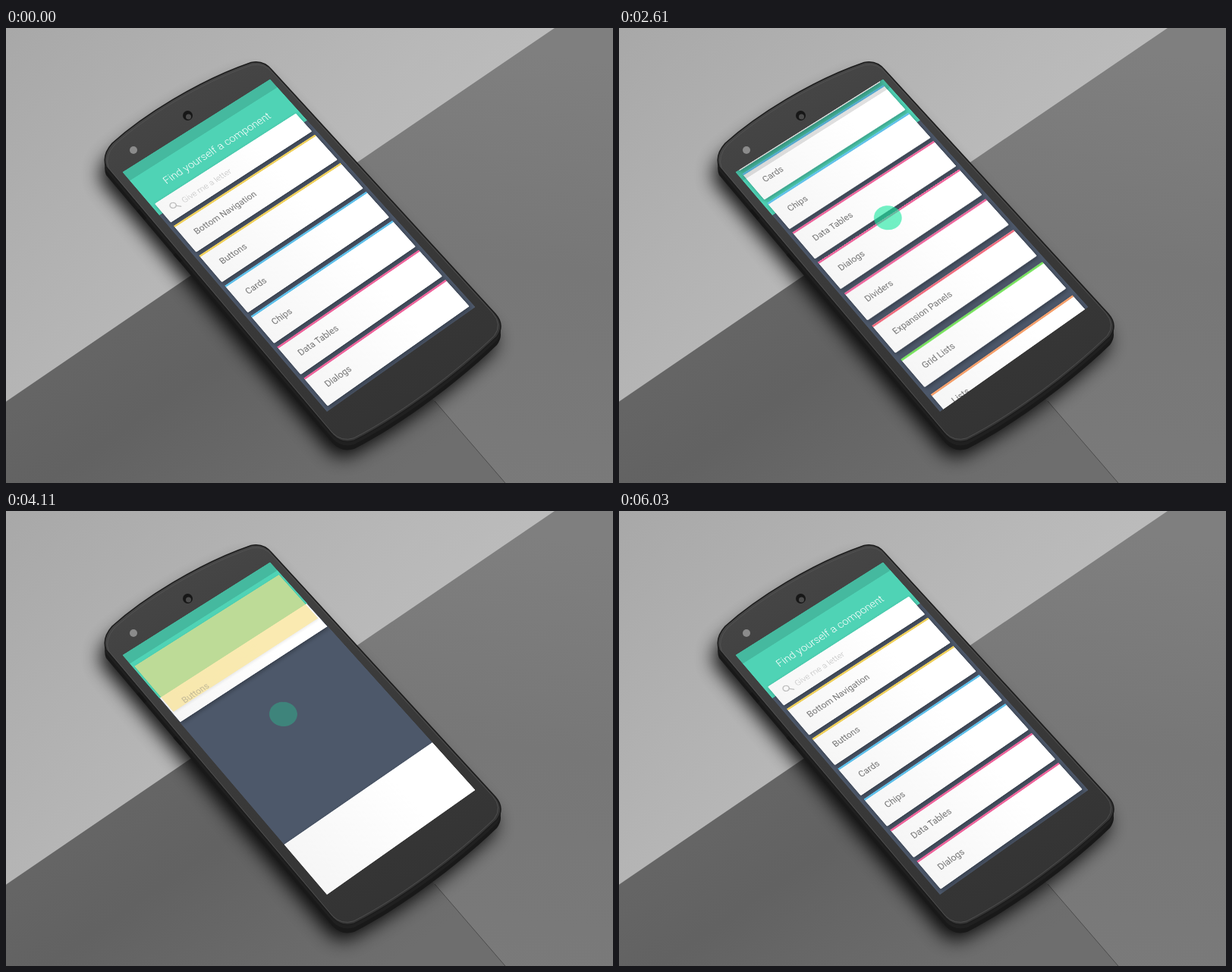
Recreate the animation shown at these times as an HTML page. Size 800x600 px, loop 6.06 s.

```html
<!DOCTYPE html>
<html lang="en">
<head>
<meta charset="utf-8">
<title>Component browser</title>
<style>
html, body { margin: 0; width: 100%; height: 100%; overflow: hidden; background: #777; }
#stage { position: relative; width: 800px; height: 600px; overflow: hidden; }
#stage > svg { position: absolute; left: 0; top: 0; }
:where(#screen) :where(div, svg) { position: absolute; left: 0; top: 0; white-space: pre; }
#screen {
  position: absolute; left: 0; top: 0; width: 360px; height: 640px; overflow: hidden;
  transform-origin: 0 0; will-change: transform; outline: 1px solid transparent;
  background: #4d586a; font-family: Roboto, sans-serif;
}
.sheet { background: linear-gradient(90deg, #f6f6f6, #fff 70%); box-shadow: 0 4px 9px rgba(0,0,0,.3); }
.card { left: 8px; width: 344px; height: 72px; border-radius: 2px; }
.stripe { width: 100%; height: 4px; }
.label { left: 24px; line-height: 72px; font-size: 17.5px; color: #757575; }
.line { line-height: 30px; }
.tab { width: 120px; text-align: center; }
.lead { color: #222; font-weight: 500; }
#header { width: 360px; height: 120px; background: #4fd3b5; }
#title { width: 360px; top: 51px; line-height: 30px; text-align: center; font-size: 22px; font-weight: 300; color: #fff; }
#search { top: 94px; left: 8px; width: 344px; height: 52px; border-radius: 2px; }
#hint { left: 46px; line-height: 54px; font-size: 17px; font-weight: 300; color: #c0c0c0; }
#moving { left: 32px; }
#rise { width: 360px; height: 640px; }
#status { width: 360px; height: 24px; background: rgba(0,0,0,.12); }
#page { width: 360px; height: 640px; color: #3c3c3c; }
#dot { width: 54px; height: 54px; margin: -27px; border-radius: 50%; background: #1de9a2; }
</style>
</head>
<body>
<div id="stage">
  <svg width="800" height="600">
    <defs>
      <linearGradient id="light" x1="0" y1="0" x2=".8" y2=".5">
        <stop stop-color="#a8a8a8"/><stop offset=".7" stop-color="#b8b8b8"/><stop offset="1" stop-color="#bdbdbd"/>
      </linearGradient>
      <linearGradient id="right" x1=".6" y1="0" x2=".4" y2="1">
        <stop stop-color="#7f7f7f"/><stop offset=".45" stop-color="#777"/><stop offset="1" stop-color="#7a7a7a"/>
      </linearGradient>
      <linearGradient id="dark" x1="0" y1="0" x2="1" y2=".6">
        <stop stop-color="#696969"/><stop offset=".5" stop-color="#626262"/><stop offset="1" stop-color="#6e6e6e"/>
      </linearGradient>
      <linearGradient id="face" x1=".2" y1="0" x2=".7" y2="1">
        <stop stop-color="#474747"/><stop offset=".4" stop-color="#3c3c3c"/><stop offset="1" stop-color="#333"/>
      </linearGradient>
      <filter id="soft" x="-30%" y="-30%" width="160%" height="160%"><feGaussianBlur stdDeviation="12"/></filter>
      <path id="body" d="M132 183Q126 168 140 152C180 116 252 70 323 45.500Q340 42 351 56L645 377Q658 392 647 407C595 457 520 513 459 544Q443 549 431 537Z"/>
    </defs>
    <rect width="800" height="600" fill="url(#right)"/>
    <path d="M0 493L245 324L500 417L565 492L658 600H0Z" fill="url(#dark)"/>
    <path d="M565 492L658 600" stroke="#4c4c4c"/>
    <path d="M0 0H723L0 492.500Z" fill="url(#light)"/>
    <use href="#body" x="-6" y="20" opacity=".9" filter="url(#soft)"/>
    <use href="#body" y="11" fill="#191919"/>
    <use href="#body" y="5" fill="#202020"/>
    <path d="M174 240l10 12M222 298l9 10" stroke="#151515" stroke-width="4"/>
    <use href="#body" fill="url(#face)" stroke="#1c1c1c" stroke-width="1.500"/>
    <use href="#body" fill="none" stroke="#555" stroke-width=".8" transform="translate(5 4) scale(.987)"/>
    <circle cx="239.500" cy="115.500" r="6.500" fill="#171717"/>
    <circle cx="240.500" cy="117" r="3.500" fill="#4b4b4b"/>
    <circle cx="168" cy="161" r="5" fill="#8b8b8b"/>
  </svg>
  <div id="screen">
    <div id="panel" class="sheet"></div>
    <div id="rise" class="sheet"></div>
    <div id="header"></div>
    <div id="list">
      <div id="title">Find yourself a component</div>
      <div id="search" class="sheet">
        <svg width="44" height="52" fill="none" stroke="#bbb" stroke-width="2"><circle cx="26" cy="24" r="6"/><path d="M30.500 28.500l7 7"/></svg>
        <div id="hint">Give me a letter</div>
      </div>
    </div>
    <div id="bar"></div>
    <div id="moving" class="label">Buttons</div>
    <div id="page"></div>
    <div id="status"></div>
    <div id="dot"></div>
  </div>
</div>
<script>
const $ = id => document.getElementById(id);
const LOOP = 6060, FIRST = 155, PITCH = 81, PICKED = 1;
const OPEN = 3810, CLOSE = 5070, SLIDE = 600, ROW_LAG = 16;

const groups = {
  '#efd05c': ['Bottom Navigation', 'Buttons'],
  '#5fc0ea': ['Cards', 'Chips'],
  '#ee659c': ['Data Tables', 'Dialogs', 'Dividers'],
  '#f0697c': ['Expansion Panels'],
  '#76e35c': ['Grid Lists'],
  '#f5a06c': ['Lists', 'Menus']
};

// Turning points of the list: time, shift
const turns = [[1240, 0], [1560, -290], [2240, -56], [2600, -306], [3380, 0]];

const drag = at => ({ at, x: 174, y: 439, lift: 186, length: 700 });
const tap = (at, x, y) => ({ at, x, y, lift: 0, length: 564 });
const touches = [drag(1240), drag(2240), tap(3600, 169, 290), tap(5024, 29, 66)];

const clamp = x => Math.min(1, Math.max(0, x));
const mix = (a, b, s) => a + (b - a) * s;
const smooth = s => s * s * (3 - 2 * s);
const out = (s, power) => 1 - (1 - s) ** power;

function shift(t) {
  return turns.slice(1).reduce((y, [end, to], i) => {
    const [begin, from] = turns[i];
    return y + (to - from) * smooth(clamp((t - begin) / (end - begin)));
  }, 0);
}

// Rows trailing the movement follow late, so the gaps only ever widen
function offset(i, t) {
  const now = shift(t);
  const below = shift(t - ROW_LAG * Math.max(0, i - 4));
  const above = shift(t - ROW_LAG * Math.max(0, 8 - i));
  return now + Math.max(0, below - now) + Math.min(0, above - now);
}

// Perspective that maps a w by h box onto four corners, clockwise from top left
function project(w, h, [x0, y0], [x1, y1], [x2, y2], [x3, y3]) {
  const ax = x1 - x2, ay = y1 - y2, bx = x3 - x2, by = y3 - y2;
  const cx = x0 - x1 + x2 - x3, cy = y0 - y1 + y2 - y3, det = ax * by - ay * bx;
  const g = (cx * by - cy * bx) / det, k = (ax * cy - ay * cx) / det;
  const m = [(x1 - x0 + g * x1) / w, (y1 - y0 + g * y1) / w, 0, g / w,
             (x3 - x0 + k * x3) / h, (y3 - y0 + k * y3) / h, 0, k / h,
             0, 0, 1, 0, x0, y0, 0, 1];
  return `matrix3d(${m.map(n => n.toFixed(8))})`;
}
$('screen').style.transform = project(360, 640, [153.5, 190], [348, 67.5], [618.5, 368], [423, 506]);

const cards = Object.entries(groups).flatMap(([color, names]) => names.map(name => {
  const card = document.createElement('div');
  card.className = 'card sheet';
  card.innerHTML = `<div class="stripe" style="background:${color}"></div><div class="label">${name}</div>`;
  $('list').append(card);
  return card;
}));

function line(text, x, middle, size, style = '', cls = '') {
  $('page').insertAdjacentHTML('beforeend',
    `<div class="line ${cls}" style="left:${x}px;top:${middle - 15}px;font-size:${size}px;${style}">${text}</div>`);
}
$('page').innerHTML = `<svg width="360" height="132" fill="none" stroke="#fff" stroke-width="2">
  <path d="M32 53H17M24 46L17 53L24 60"/>
  <path d="M336 46v.1m0 6v.1m0 6v.1" stroke-width="4" stroke-linecap="round"/>
  <path d="M0 127h120" stroke-width="4"/></svg>`;
line('Buttons', 70, 52, 20, 'color:#fff;font-weight:500');
['OVERVIEW', 'USAGE', 'STYLE'].forEach((tab, i) =>
  line(tab, i * 120, 105, 14, `color:rgba(255,255,255,${i ? .7 : 1})`, 'tab'));
line('Buttons', 15, 166, 24, 'color:#f0c84a;font-weight:500');
line('Buttons communicate the action that', 17, 218, 17.7, '', 'lead');
line('will occur when the user touches them.', 17, 246, 17.7, '', 'lead');
`Material buttons trigger an ink reaction on press.
They may display text, imagery, or both. Flat buttons
and raised buttons are the most commonly used
types.

Additional button types include:

Persistent footer buttons are flat buttons that may be
used in screen footers or dialogs.
Dropdown buttons display multiple selections.
Toggle buttons group related options. Icon toggles
allow a single choice to be selected or deselected.
Flat buttons

Flat buttons are text-only buttons.
They may be used in dialogs, toolbars, or inline`
  .split('\n').forEach((text, i) => line(text, 17, 292 + 23 * i, 13.7));

function box(el, margin, top, bottom) {
  Object.assign(el.style, {
    left: margin + 'px', width: 360 - 2 * margin + 'px',
    top: top + 'px', height: bottom - top + 'px'
  });
}

function drawList(t, p) {
  const fade = clamp(1 - p / .3);
  cards.forEach((card, i) => {
    const y = FIRST + PITCH * i + offset(i, t) + Math.sign(i - PICKED) * p * 200;
    card.style.transform = `translateY(${y}px)`;
    card.style.opacity = i === PICKED ? +(p === 0) : fade;
  });
  for (const id of ['title', 'search']) {
    $(id).style.transform = `translateY(${offset(0, t)}px)`;
    $(id).style.opacity = fade;
  }
}

// The picked card flies up into the header while a white sheet rises
function drawOpening(p) {
  for (const id of ['panel', 'rise', 'bar', 'moving'])
    $(id).style.visibility = p > 0 ? 'visible' : 'hidden';
  const top = mix(236, 0, out(p, 2.8)), tint = p ** .62;
  box($('panel'), 8 * (1 - p) ** 3, Math.max(110, top), mix(308, 128, out(p, 1.63)));
  box($('bar'), 8 * (1 - p), top, mix(308, 128, out(p, 2.5)));
  Object.assign($('bar').style, {
    opacity: tint,
    background: `rgb(${[244, 207, 73].map(c => mix(255, c, tint))})`,
    boxShadow: `0 2px 6px rgba(0,0,0,${.3 * p})`
  });
  $('rise').style.top = mix(640, 128, p * p) + 'px';
  $('moving').style.top = mix(272, 60, out(p, 1.2)) - 36 + 'px';
  $('moving').style.opacity = clamp(1 - 1.2 * p);
}

function drawTouch(t) {
  const touch = touches.findLast(c => c.at <= t) || touches[0];
  const s = t - touch.at;
  Object.assign($('dot').style, {
    left: touch.x + 'px',
    top: touch.y - touch.lift * Math.sin(Math.PI * clamp(s / 660)) + 'px',
    opacity: .62 * clamp(s / 80) * clamp((touch.length - s) / 110)
  });
}

function draw(t) {
  const p = clamp((t - OPEN) / SLIDE) - clamp((t - CLOSE) / SLIDE);
  drawList(t, p);
  drawOpening(p);
  drawTouch(t);
  $('page').style.opacity = clamp((t - 4440) / 420) * (1 - clamp((t - CLOSE) / 130));
}

const start = performance.now();
function tick() {
  draw((performance.now() - start) % LOOP);
  requestAnimationFrame(tick);
}
tick();
</script>
</body>
</html>
```
